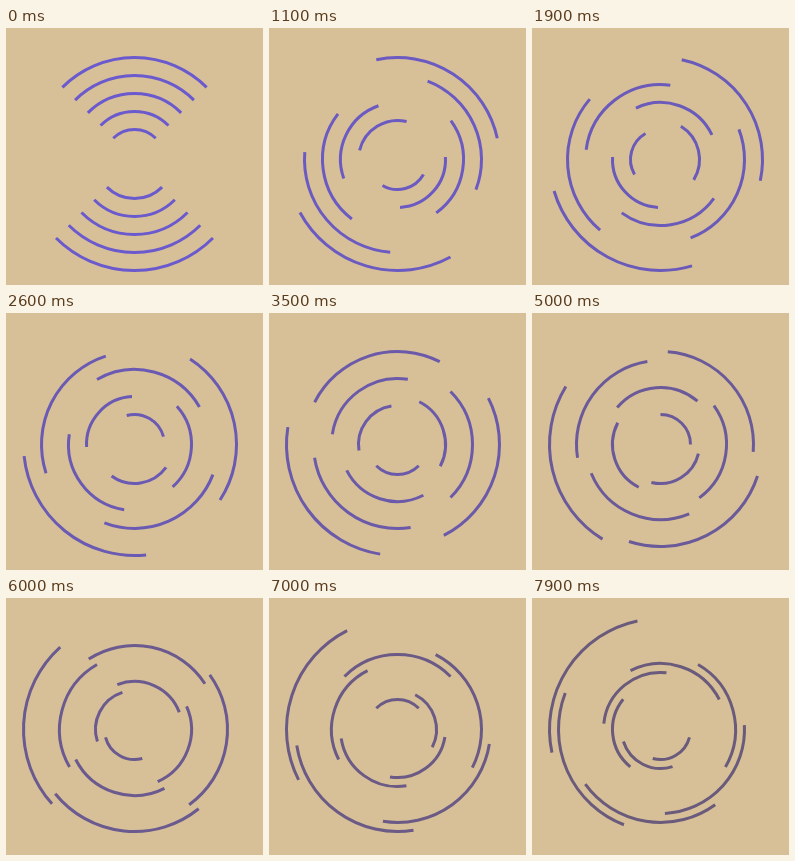
Recreate the animation shown at these times as an HTML page. Size 257 px wide and 257 px high, loop 8000 ms.

```html
<!DOCTYPE html>
<html lang="en">
<head>
<meta charset="utf-8">
<title>Rotating arcs</title>
<style>
  html, body { margin: 0; width: 100%; height: 100%; overflow: hidden; background: #d7bf97; }
  svg { display: block; width: 100vw; height: 100vh; }
</style>
</head>
<body>
<svg viewBox="0 0 257 257">
  <g id="arcs" transform="translate(128.5 131.5)" fill="none" stroke="rgb(106,90,205)" stroke-width="3"></g>
</svg>
<script>
  const LOOP = 8000, STEP = 100, COUNT = 10;
  const group = document.getElementById('arcs');

  // Quarter arcs, alternately facing up and down, from the inside out
  const arcs = Array.from({ length: COUNT }, (_, i) => {
    const path = document.createElementNS('http://www.w3.org/2000/svg', 'path');
    const r = 30 + 9 * i;
    const h = r * Math.SQRT1_2;
    path.setAttribute('d', `M${-h} ${-h}A${r} ${r} 0 0 1 ${h} ${-h}`);
    group.append(path);
    return { path, start: i % 2 ? 180 : 0, speed: 1.5 * (COUNT - i) };
  });

  function draw(time) {
    const n = Math.floor((time % LOOP) / STEP);
    // One pose is skipped about every 26 steps
    const pose = n + Math.floor(n / 26.2);
    group.setAttribute('stroke', `rgb(106,90,${205 - pose})`);
    for (const { path, start, speed } of arcs) {
      path.setAttribute('transform', `rotate(${start + speed * pose})`);
    }
  }

  function tick() {
    draw(performance.now());
    requestAnimationFrame(tick);
  }

  draw(0);
  requestAnimationFrame(tick);
</script>
</body>
</html>
```
